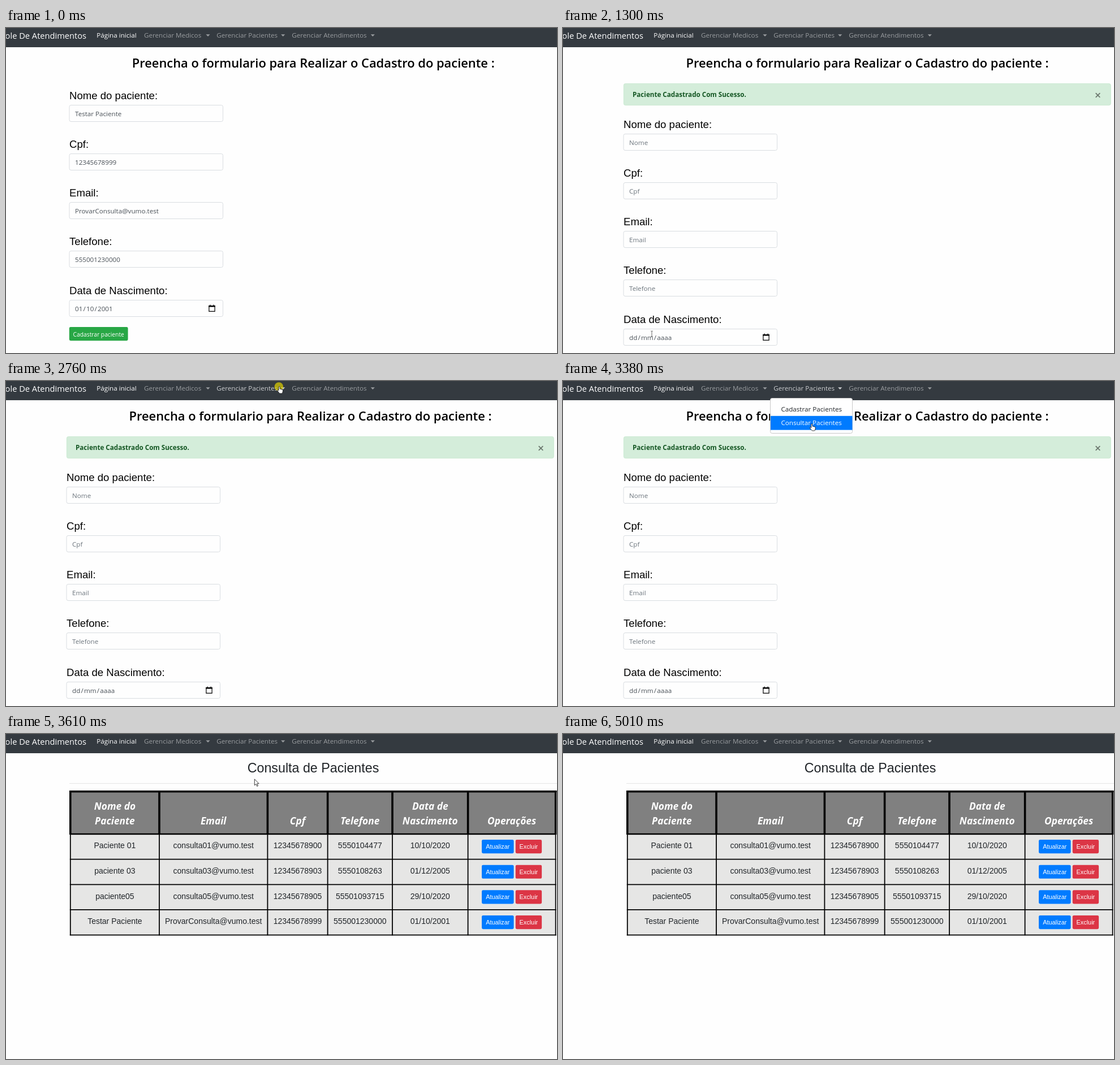
Recreate the animation shown at these times as an HTML page. Size 974 by 575 pixels, loop 6.1 s.

```html
<!DOCTYPE html>
<html lang="pt-BR">
<head>
<meta charset="utf-8">
<title>Cadastro de pacientes</title>
<style>
html, body { margin: 0; width: 100%; height: 100%; overflow: hidden; background: #fefefe; }
svg { display: block; }
.ui { font: 11.65px "Open Sans", "Noto Sans", sans-serif; }
.sans { font-family: "Liberation Sans", Arial, sans-serif; }
.brand { font-size: 14.65px; }
.heading { font-size: 21.9px; font-weight: 600; }
.label { font-size: 18.6px; }
.title { font-size: 23.25px; }
.cell { font-size: 14px; }
.small { font-size: 10.28px; }
.tiny { font-size: 10.87px; }
.th { font-size: 17.3px; font-weight: 700; font-style: italic; }
.alert { font-weight: 700; }
.close { font-size: 20px; font-weight: 600; opacity: .5; }
.mid { text-anchor: middle; }
.end { text-anchor: end; }
.link { fill: #999c9f; }
.link.hot { fill: #ccced0; }
.field { fill: #fefefe; stroke: #d9dde1; }
#submit { fill: #28a745; }
#submit.hover { fill: #218838; }
#submit.active { fill: #1e7e34; }
.item rect { fill: none; }
.item text { fill: #212529; }
.item.hover rect { fill: #f8f9fa; }
.item.active rect { fill: #007bff; }
.item.active text { fill: #fff; }
.off { display: none; }
</style>
</head>
<body>
<svg id="stage" class="ui" width="974" height="575" xmlns="http://www.w3.org/2000/svg"></svg>
<script>
const LOOP = 6100;
const stage = document.getElementById('stage');

const text = (x, y, str, cls = '', fill = '#000') =>
  `<text x="${x}" y="${y}" class="${cls}" fill="${fill}">${str}</text>`;
const rect = (x, y, w, h, attrs) =>
  `<rect x="${x}" y="${y}" width="${w}" height="${h}" ${attrs}/>`;
const line = (x1, y1, x2, y2, w) =>
  `<path d="M${x1} ${y1}L${x2} ${y2}" stroke="#000" stroke-width="${w}"/>`;
const range = n => [...Array(n).keys()];

// Navigation bar
function navLink(id, x, label, caretX) {
  return `<g id="${id}" class="link"><text x="${x}" y="17.3">${label}</text>
    <path d="M${caretX - 3.6} 11.2h7.2l-3.6 3.7z"/></g>`;
}
const nav = rect(0, 0, 974, 34, 'fill="#343a40"') +
  text(142, 19.3, 'Controle De Atendimentos', 'brand end', '#fff') +
  text(160.3, 17.3, 'Página inicial', '', '#fff') +
  navLink('doctors', 244, 'Gerenciar Medicos', 357) +
  navLink('patients', 372.3, 'Gerenciar Pacientes', 489.7) +
  navLink('visits', 505.3, 'Gerenciar Atendimentos', 648.3);

const menuItem = (id, y, label) =>
  `<g id="${id}" class="item">${rect(367, y, 144.5, 24.8, '')}
    <text x="385.4" y="${y + 16.6}">${label}</text></g>`;
const menu = `<g id="menu">${rect(366.5, 30.5, 145, 62, 'rx="3" fill="#fff" stroke="#c8c8c8"')}
  ${menuItem('itemNew', 37, 'Cadastrar Pacientes')}${menuItem('itemList', 61.8, 'Consultar Pacientes')}</g>`;

// Registration form
const labels = ['Nome do paciente:', 'Cpf:', 'Email:', 'Telefone:', 'Data de Nascimento:'];
const PITCH = 86.25;

const dateText = str =>
  str.split('/').join('<tspan dx="1.2">/</tspan><tspan dx="1.2">') + '</tspan>'.repeat(2);

function form(values, color) {
  return labels.map((label, i) => {
    const y = Math.floor(i * PITCH);
    const last = i === 4;
    return text(112, 126 + y, label, 'sans label') +
      rect(112, 136.5 + y, 271.5, 29, 'rx="3" class="field"') +
      text(122, 156 + y, last ? dateText(values[i]) : values[i], '', last ? '#495057' : color);
  }).join('') +
    `<path d="M358.9 491.5h10.2v9.9h-10.2z" fill="none" stroke="#000" stroke-width="1.2"/>
     <path d="M358.3 490.9h11.4v2.7h-11.4zM360.2 489.4h1.3v2h-1.3zM366.6 489.4h1.3v2h-1.3z"/>`;
}

const heading = x =>
  text(x, 70, 'Preencha o formulario para Realizar o Cadastro do paciente :', 'heading mid');

const filledPage = `<g id="filled">${heading(543.2)}
  ${form(['Testar Paciente', '12345678999', 'ProvarConsulta@vumo.test', '555001230000', '01/10/2001'], '#495057')}
  ${rect(110.6, 527.8, 106.2, 26.6, 'id="ring" rx="4" fill="none" stroke="#93d3a2" stroke-width="2.6"')}
  ${rect(111.8, 529, 103.8, 24.2, 'id="submit" rx="2.4"')}
  ${text(118.6, 545.5, 'Cadastrar paciente', 'small', '#fff')}</g>`;

const savedPage = `<g id="saved">${heading(538)}
  ${rect(107.4, 98.4, 860.8, 38.2, 'rx="3" fill="#d4edda" stroke="#c3e6cb" stroke-width=".8"')}
  ${text(123, 122.3, 'Paciente Cadastrado Com Sucesso.', 'alert', '#155724')}
  ${text(945.5, 126.2, '×', 'close mid')}
  <g transform="translate(-5 51)">
  ${form(['Nome', 'Cpf', 'Email', 'Telefone', 'dd/mm/aaaa'], '#6c757d')}</g></g>`;

// Patient list
const listTitle = `<g id="listTitle">${text(543, 68.4, 'Consulta de Pacientes', 'sans title mid', '#212529')}
  ${rect(112, 87, 862, 1, 'fill="#e5e5e5"')}</g>`;

function headerCells(xs, bottom, names) {
  const mids = xs.slice(1).map((x, i) => (x + xs[i]) / 2);
  const base = bottom > 160 ? 160.4 : 134;
  return rect(xs[0], 101, xs[6] - xs[0], bottom - 101, 'fill="#808080"') +
    line(xs[0] - 1.8, 101.8, xs[6] + 1.8, 101.8, 3.6) +
    xs.map(x => line(x, 100, x, bottom, 3.6)).join('') +
    names.map((name, i) => {
      const rows = name.split('|');
      return rows.map((row, k) =>
        text(mids[i], base - 26.4 * (rows.length - 1 - k), row, 'th mid', '#fff')).join('');
    }).join('');
}

const emptyTable = `<g id="emptyTable">${headerCells([113.8, 329.8, 416.2, 479.6, 596.4, 836, 971.6], 150,
  ['Nome do Paciente', 'Email', 'Cpf', 'Telefone', 'Data de Nascimento', 'Operações'])}</g>`;

const cols = [113.8, 271, 462.4, 568.6, 683, 816.6, 971.6];
const people = [
  ['Paciente 01', 'consulta01@vumo.test', '12345678900', '5550104477', '10/10/2020'],
  ['paciente 03', 'consulta03@vumo.test', '12345678903', '5550108263', '01/12/2005'],
  ['paciente05', 'consulta05@vumo.test', '12345678905', '55501093715', '29/10/2020'],
  ['Testar Paciente', 'ProvarConsulta@vumo.test', '12345678999', '555001230000', '01/10/2001']
];
const ROW = 44.65;

function tableRow(person, i) {
  const y = i * ROW;
  return person.map((value, c) =>
    text((cols[c] + cols[c + 1]) / 2, 202.2 + y, value, 'sans cell mid', '#212529')).join('') +
    rect(841, 187 + y, 56.6, 24.2, 'rx="2.4" fill="#007bff"') +
    text(869.3, 203 + y, 'Atualizar', 'sans tiny mid', '#fff') +
    rect(900.7, 187 + y, 46.4, 24.2, 'rx="2.4" fill="#dc3545"') +
    text(923.9, 203 + y, 'Excluir', 'sans tiny mid', '#fff');
}

const fullTable = `<g id="fullTable">
  ${rect(113.8, 177, 857.8, 178.6, 'fill="#e6e6e5"')}
  ${cols.map(x => line(x, 177, x, 356.4, 1.8)).join('')}
  ${headerCells(cols, 178, ['Nome do|Paciente', 'Email', 'Cpf', 'Telefone', 'Data de|Nascimento', 'Operações'])}
  ${range(5).map(i => line(112.8, 177 + i * ROW, 972.6, 177 + i * ROW, i ? 1.8 : 2.6)).join('')}
  ${people.map(tableRow).join('')}</g>`;

// Pointer shapes, each with its hot spot at the origin
const pointer = `<g id="pointer">
  <circle id="click" r="7.8" fill="#e1d200" fill-opacity=".7"/>
  <path id="arrow" d="M0 0V11l2.6-2.3 1.8 4 1.8-.8-1.8-3.9h3.4z" fill="#fff" stroke="#222" stroke-width=".9"/>
  <path id="beam" d="M-1.8-4.8h1.3l.5.5.5-.5h1.3M0-4.5v9M-1.8 4.8h1.3l.5-.5.5.5h1.3" fill="none" stroke="#444" stroke-width=".8"/>
  <path id="hand" d="M-.2.4Q.9-1 2 .4V4l4 1q1.5.4 1.3 2l-.6 3q-.3 1.4-1 2H1.4q-.6-.8-1.6-1.8L-2.4 7q-.5-1.2.7-1.4L-.2 6.8z" fill="#fff" stroke="#111" stroke-width=".8"/>
</g>`;

stage.innerHTML = filledPage + savedPage + listTitle + emptyTable + fullTable + nav + menu + pointer;

const el = {};
stage.querySelectorAll('[id]').forEach(node => { el[node.id] = node; });
const show = (id, on) => el[id].classList.toggle('off', !on);
const mark = (id, cls, on) => el[id].classList.toggle(cls, on);

// Pointer moves: start, end, steps, x, y, shape on the way, shape at rest
const moves = [
  [70, 680, 9, 132, 474, 'arrow', 'beam'],
  [760, 990, 4, 155.5, 534.5, 'arrow', 'hand'],
  [1300, 1300, 1, 157, 541, 'beam', 'beam'],
  [1760, 1990, 4, 313, 65, 'arrow', 'beam'],
  [2217, 2680, 7, 482.3, 10, 'arrow', 'hand'],
  [2837, 3070, 4, 439, 76, 'hand', 'hand'],
  [3530, 3530, 1, 439.3, 79.8, 'arrow', 'arrow'],
  [3840, 4000, 3, 439, 95, 'arrow', 'arrow'],
  [4150, 4380, 4, 670, 355, 'arrow', 'arrow'],
  [4453, 4530, 2, 657, 346, 'arrow', 'arrow'],
  [4700, 4933, 4, 853, 386, 'arrow', 'arrow']
];
const clicks = [[1140, 1220], [2760, 2837], [3230, 3306]];
const ease = p => (1 - Math.cos(Math.PI * p)) / 2;

function pointerAt(t) {
  let x = 469, y = 528, shape = 'arrow';
  for (const [start, end, steps, tx, ty, way, rest] of moves) {
    if (t < start) break;
    const gap = (end - start) / (steps - 1 || 1) || 1;
    const step = Math.min(steps, Math.floor((t - start) / gap + 1e-6) + 1);
    const p = ease(step / steps);
    x += (tx - x) * p;
    y += (ty - y) * p;
    shape = step === steps ? rest : way;
  }
  return { x, y, shape };
}

function draw(t) {
  const { x, y, shape } = pointerAt(t);
  const within = (a, b) => t >= a && t < b;

  show('filled', t < 1300);
  show('saved', within(1300, 3530));
  show('listTitle', t >= 3530);
  show('emptyTable', within(3530, 3610));
  show('fullTable', t >= 3610);

  mark('submit', 'hover', within(913, 1140));
  mark('submit', 'active', within(1140, 1300));
  show('ring', within(1140, 1300));

  const open = within(2837, 3530);
  show('menu', open);
  mark('patients', 'hot', within(2603, 3530));
  mark('itemNew', 'hover', open && y > 37 && y < 61.8);
  mark('itemList', 'hover', open && y >= 61.8);
  mark('itemList', 'active', within(3230, 3530));

  show('pointer', within(70, 5010));
  ['arrow', 'beam', 'hand'].forEach(id => show(id, id === shape));
  show('click', clicks.some(([a, b]) => within(a, b)));
  el.pointer.setAttribute('transform', `translate(${x.toFixed(1)} ${y.toFixed(1)})`);
}

const begin = performance.now();
function tick() {
  draw((performance.now() - begin) % LOOP);
  requestAnimationFrame(tick);
}
tick();
</script>
</body>
</html>
```
